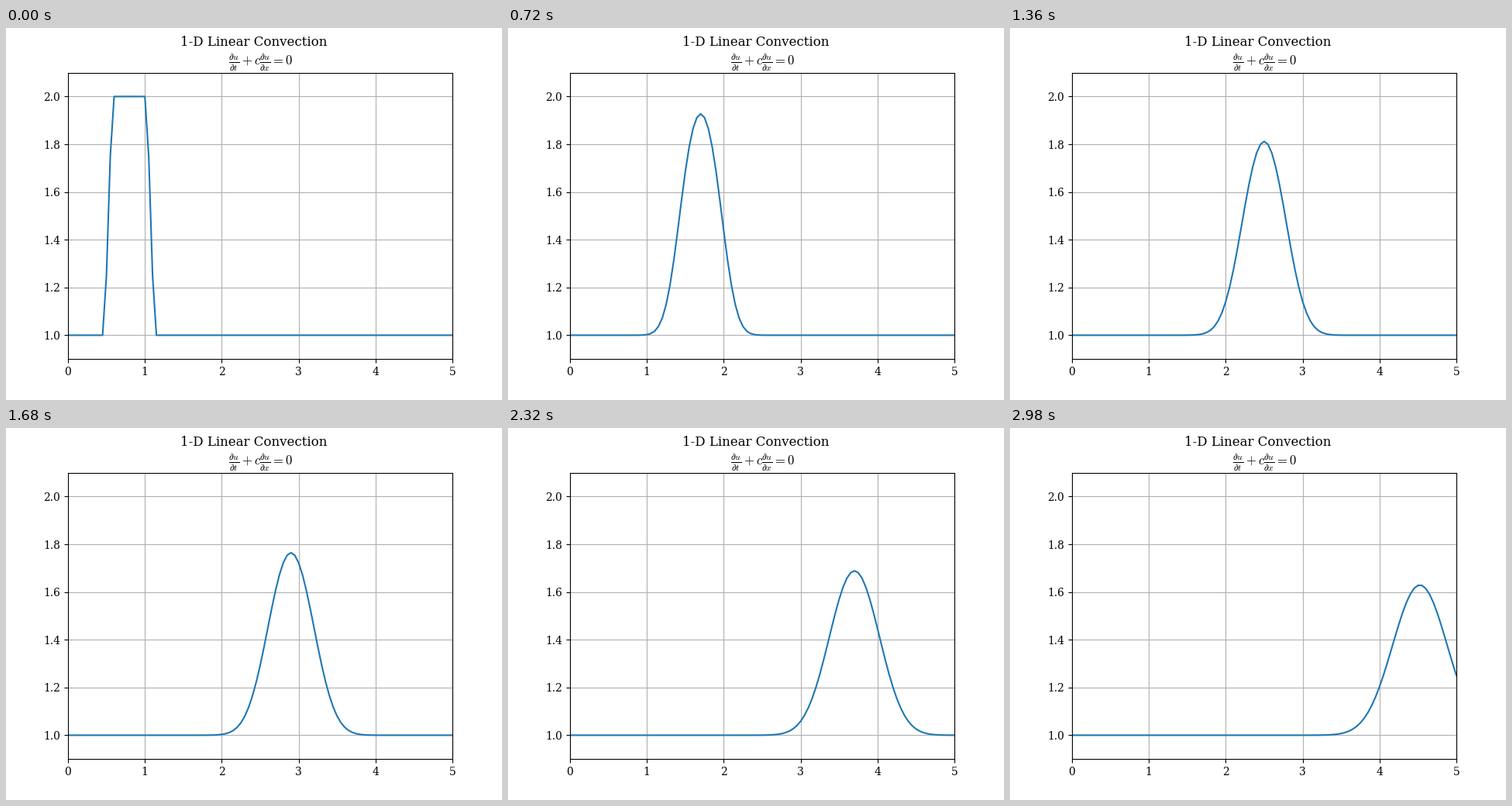
Animation, 640 px wide and 480 px high, one loop 3000 ms. Source, as a matplotlib script:

```python
import matplotlib.pyplot as plt
import numpy as np
from matplotlib.animation import FuncAnimation

plt.rcParams["font.family"] = "DejaVu Serif"
plt.rcParams["mathtext.fontset"] = "cm"

FRAMES, INTERVAL = 150, 20
LENGTH, CELLS = 5.0, 100
CFL = 0.5  # c * dt / dx

x = np.linspace(0, LENGTH, CELLS + 1)


def solve(steps):
    """First-order upwind solution after every time step."""
    u = np.ones_like(x)
    u[10:21] = 2  # square pulse on 0.5 <= x <= 1
    history = [u]
    for _ in range(steps):
        nxt = u.copy()
        nxt[1:] -= CFL * (u[1:] - u[:-1])
        history.append(nxt)
        u = nxt
    return history


# The first picture already shows the pulse after two steps.
waves = solve(FRAMES + 1)[2:]

fig, ax = plt.subplots(figsize=(6.4, 4.8), dpi=100)
fig.suptitle("1-D Linear Convection")
ax.set_title(r"$\frac{\partial u}{\partial t}"
             r" + c\frac{\partial u}{\partial x} = 0$")
ax.set_xlim(0, LENGTH)
ax.set_ylim(0.9, 2.1)
ax.grid(True)
line, = ax.plot(x, waves[0], color="C0", lw=1.5)


def update(i):
    line.set_ydata(waves[i])
    return line,


anim = FuncAnimation(fig, update, frames=FRAMES, interval=INTERVAL,
                     repeat=True, repeat_delay=0)
plt.show()
```
